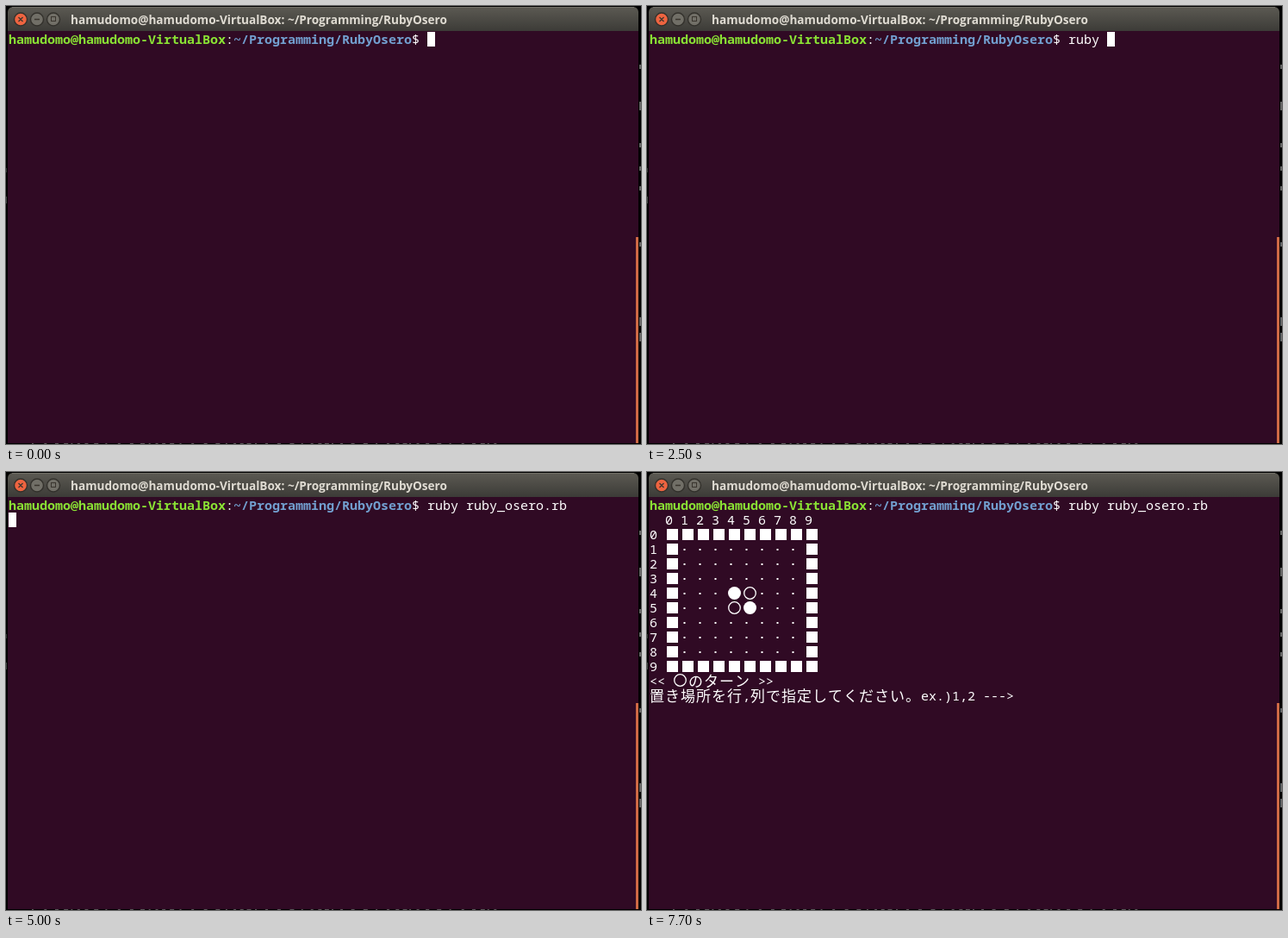
Animation, 737 px wide and 508 px high, one loop 8 s. Source, as an HTML page with a canvas:

```html
<!DOCTYPE html>
<html lang="ja">
<head>
<meta charset="utf-8">
<title>Terminal</title>
<style>
html, body { margin: 0; width: 100%; height: 100%; overflow: hidden; background: #000; }
canvas { display: block; }
</style>
</head>
<body>
<canvas id="stage" width="737" height="508"></canvas>
<script>
const ctx = document.getElementById('stage').getContext('2d');
const LOOP = 8000, COL = 9, ROW = 17, LEFT = 3, TOP = 30;
const MONO = '15px "Noto Sans Mono", "DejaVu Sans Mono", monospace';
const CJK = '17px "Noto Sans CJK JP", "Noto Sans CJK", sans-serif';
const WHITE = '#fff';
const USER = 'hamudomo', HOST = USER + '@' + USER + '-VirtualBox';
const PATH = '~/Programming/RubyOsero';
const COMMAND = 'ruby ruby_osero.rb ';
const START = HOST.length + PATH.length + 3;

// [time, number of typed characters]
const KEYS = [[1600, 1], [1700, 2], [1800, 3], [2000, 4], [2500, 5],
  [3900, 6], [4100, 7], [4200, 8], [4300, 9], [4500, 19]];
const ENTER = 5000, BOARD = 5100;
// spans in which the cursor is hidden
const HIDDEN = [[3100, 3600], [5500, 6100], [6600, 7200], [7700, 8000]];

function rect(x, y, w, h, color) {
  ctx.fillStyle = color;
  ctx.fillRect(x, y, w, h);
}

function disc(x, y, r, fill, line, width = 1) {
  ctx.beginPath();
  ctx.arc(x, y, r, 0, Math.PI * 2);
  if (fill) { ctx.fillStyle = fill; ctx.fill(); }
  if (line) { ctx.strokeStyle = line; ctx.lineWidth = width; ctx.stroke(); }
}

const cellX = col => LEFT + col * COL;
const rowY = row => TOP + row * ROW;

// Writes on the character grid; wide characters take two columns.
function write(text, col, row, color = WHITE, weight = '') {
  ctx.fillStyle = color;
  const y = rowY(row) + 14;
  for (const part of text.match(/[\u3000-\u9fff]|[^\u3000-\u9fff]+/g) || []) {
    const wide = part >= '\u3000';
    ctx.font = wide ? CJK : weight + ' ' + MONO;
    ctx.fillText(part, cellX(col), y + (wide ? 1 : 0));
    col += wide ? 2 : part.length;
  }
}

function button(x, fill) {
  disc(x, 15.5, 7.5, fill, '#33312c', 1.4);
}

function drawWindow() {
  rect(0, 0, 737, 508, '#000');

  // slivers of the desktop behind the window
  for (const y of [72, 115, 163, 190, 213, 278, 365, 383])
    rect(735, y - 4, 2, y > 360 || y === 115 ? 10 : 5, '#666');
  rect(0, 188, 1, 5, '#333');
  rect(0, 221, 1, 8, '#444');
  for (let i = 0; i < 50; i++)
    rect(30 + i * 11 + 5 * Math.sin(i * 7), 507, 2 + i % 4, 1, '#555');

  const bar = ctx.createLinearGradient(0, 1, 0, 29);
  bar.addColorStop(0, '#5c5a53');
  bar.addColorStop(1, '#3c3b37');
  ctx.fillStyle = bar;
  ctx.beginPath();
  ctx.roundRect(2, 1, 732, 28, [6, 6, 0, 0]);
  ctx.fill();
  rect(7, 1, 722, 1, '#74726a');

  button(17, '#ee6440');
  button(36, '#716f67');
  button(55, '#716f67');
  ctx.strokeStyle = '#3a352e';
  ctx.lineWidth = 1.3;
  ctx.beginPath();
  ctx.moveTo(14.5, 13); ctx.lineTo(19.5, 18);
  ctx.moveTo(19.5, 13); ctx.lineTo(14.5, 18);
  ctx.moveTo(33, 15.5); ctx.lineTo(39, 15.5);
  ctx.stroke();
  ctx.lineWidth = 1;
  ctx.strokeRect(52.5, 12.5, 5, 5);

  ctx.font = 'bold 13.6px "Open Sans", "Noto Sans", sans-serif';
  ctx.fillStyle = '#dfdbd2';
  ctx.fillText(HOST + ': ' + PATH, 75, 21);

  rect(2, 29, 732, 478, '#300a24');
  rect(731, 268, 3, 239, '#cf6a45');
}

function drawBoard() {
  write('0 1 2 3 4 5 6 7 8 9', 2, 1);
  for (let r = 0; r < 10; r++) {
    write(String(r), 0, r + 2);
    const y = rowY(r + 2);
    for (let c = 0; c < 10; c++) {
      const x = cellX(2 + c * 2);
      const edge = r % 9 === 0 || c % 9 === 0;
      const piece = (r === 4 || r === 5) && (c === 4 || c === 5);
      if (edge) rect(x + 2, y + 2, 13, 13, WHITE);
      else if (!piece) rect(x + 3.5, y + 8, 2, 2, WHITE);
      else if (r === c) disc(x + 8.5, y + 8.5, 7.5, WHITE);
      else disc(x + 8.5, y + 8.5, 6.8, null, WHITE, 1.3);
    }
  }
  write('<<', 0, 12);
  disc(cellX(3) + 8.5, rowY(12) + 7.5, 6.8, null, WHITE, 1.3);
  write('のターン >>', 5, 12);
  write('置き場所を行,列で指定してください。ex.)1,2 --->', 0, 13);
}

function draw(t) {
  drawWindow();
  write(HOST, 0, 0, '#8ae234', 'bold');
  write(':', HOST.length, 0);
  write(PATH, HOST.length + 1, 0, '#729fcf', 'bold');
  write('$', START - 2, 0);

  let typed = 0;
  for (const [time, count] of KEYS) if (t >= time) typed = count;
  write(COMMAND.slice(0, typed), START, 0);

  let col = START + typed, row = 0;
  if (t >= BOARD) {
    drawBoard();
    [col, row] = [48, 13];
  } else if (t >= ENTER) {
    [col, row] = [0, 1];
  }
  if (!HIDDEN.some(([a, b]) => t >= a && t < b))
    rect(cellX(col), rowY(row), COL, ROW, WHITE);
}

const begin = performance.now();
function tick() {
  draw((performance.now() - begin) % LOOP);
  requestAnimationFrame(tick);
}
tick();
</script>
</body>
</html>
```
